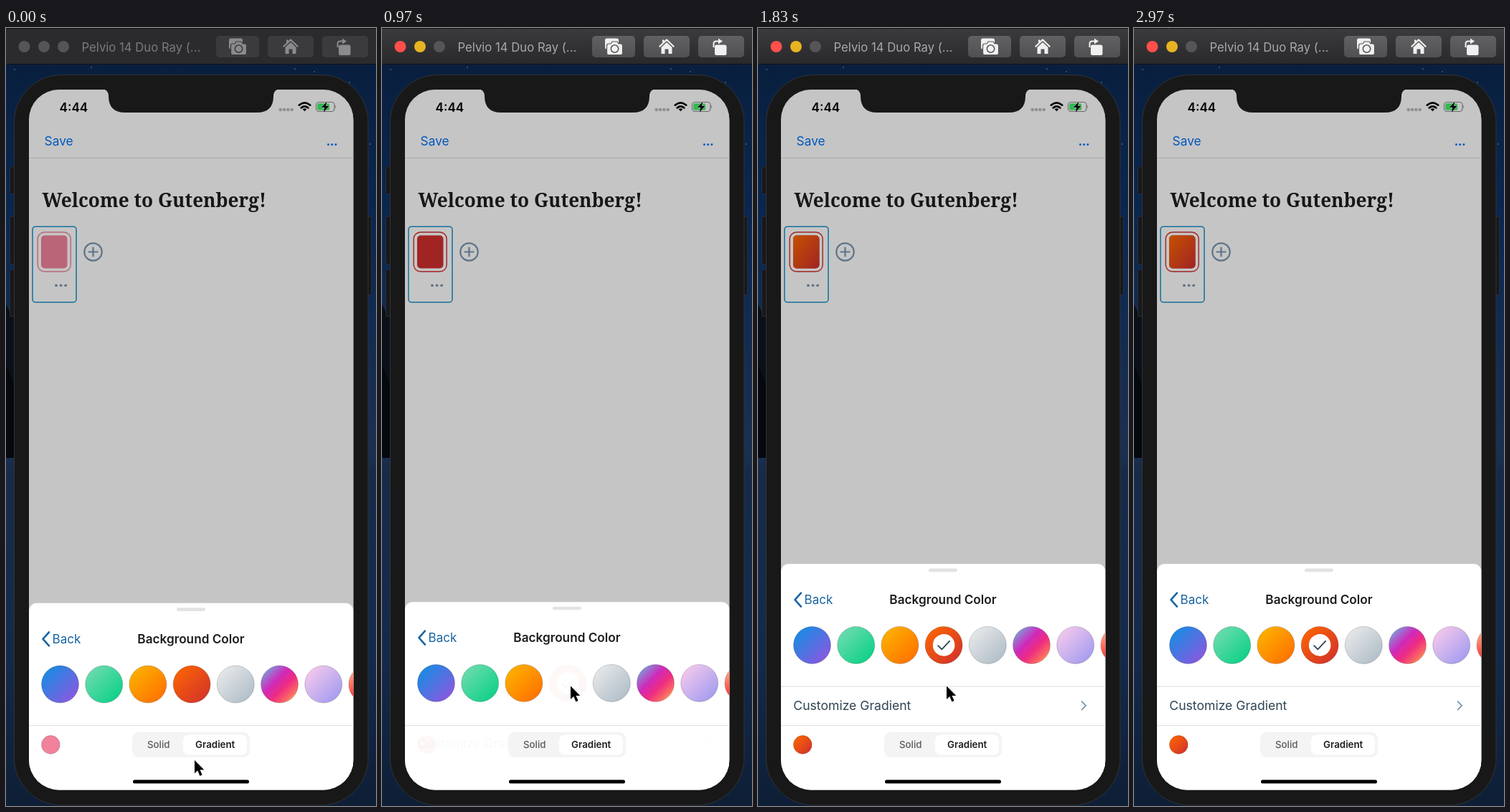
Write an HTML page that moves like this. It is 516 px wide and 1086 px high and loops after 3010 ms.

```html
<!DOCTYPE html>
<html lang="en">
<head>
<meta charset="utf-8">
<title>Gradient picker</title>
<style>
html, body { margin: 0; width: 100%; height: 100%; overflow: hidden; background: #0b1d38; }
svg { display: block; width: 100vw; height: 100vh; }
text { font-family: Inter, "Noto Sans", sans-serif; }
.line { fill: none; stroke-linecap: round; stroke-linejoin: round; }
</style>
</head>
<body>
<svg viewBox="0 0 516 1086" xmlns="http://www.w3.org/2000/svg">
  <defs id="defs">
    <linearGradient id="sky" x2="0" y2="1">
      <stop offset="0" stop-color="#081d3a"/>
      <stop offset=".25" stop-color="#0b2750"/>
      <stop offset=".54" stop-color="#1b2f50"/>
      <stop offset=".57" stop-color="#172b49"/>
      <stop offset=".8" stop-color="#142a4b"/>
      <stop offset="1" stop-color="#0e1e36"/>
    </linearGradient>
    <linearGradient id="bar" x2="0" y2="1">
      <stop offset="0" stop-color="#3b3b3d"/>
      <stop offset="1" stop-color="#29292b"/>
    </linearGradient>
    <linearGradient id="key" x2="0" y2="1">
      <stop offset="0" stop-color="#616163"/>
      <stop offset="1" stop-color="#505052"/>
    </linearGradient>
    <clipPath id="screen"><rect x="32" y="86" width="452.500" height="977.500" rx="42"/></clipPath>
  </defs>

  <!-- desktop -->
  <rect width="516" height="1086" fill="url(#sky)"/>
  <path d="M0 385L5 396L12 402V600H0Z" fill="#0b1018"/>
  <path d="M0 470L12 500V600H0Z" fill="#05080e"/>
  <g id="stars" fill="#9fb4d0"></g>

  <!-- title bar -->
  <rect id="barBg" width="516" height="50"/>
  <path d="M0 .5H516M0 50.500H516" stroke="#111" stroke-width="1"/>
  <circle id="close" cx="25.500" cy="26" r="8"/>
  <circle id="mini" cx="53" cy="26" r="8"/>
  <circle cx="80" cy="26" r="8" fill="#555557"/>
  <text id="device" x="105.500" y="32.500" font-size="16.700">Pelvio 14 Duo Ray (...</text>
  <g id="keys">
    <rect x="293" y="11" width="60" height="30" rx="5"/>
    <rect x="365" y="11" width="64" height="30" rx="5"/>
    <rect x="441" y="11" width="64" height="30" rx="5"/>
  </g>
  <g id="icons">
    <rect x="311" y="14.500" width="19" height="15" rx="2.500"/>
    <path class="ink" d="M316 22H319L321 19H328L330 22H333Q335.500 22 335.500 24.500V35Q335.500 37.500 333 37.500H316Q313.500 37.500 313.500 35V24.500Q313.500 22 316 22Z" stroke-width="1.200"/>
    <circle class="cut" cx="324.500" cy="29" r="5.200" fill="none" stroke-width="1.600"/>
    <path d="M397 15L408 25.500L406.500 27L397 18L387.500 27L386 25.500L391 20.700V16.500H393.500V18.300Z"/>
    <path d="M389.500 27L397 20L404.500 27V36H399.500V29.500H394.500V36H389.500Z"/>
    <rect x="464" y="23.500" width="16.500" height="14.500" rx="2.500"/>
    <path class="wire" d="M462.500 27V22Q462.500 18.500 466 18.500H470" fill="none" stroke-width="2"/>
    <path d="M469 14.500L475 18.500L469 22.500Z"/>
  </g>

  <!-- phone body -->
  <g fill="#17181b" stroke="#2b2d31">
    <rect x="5.500" y="193.500" width="9" height="38" rx="2"/>
    <rect x="5.500" y="263.500" width="9" height="66" rx="2"/>
    <rect x="5.500" y="337.500" width="9" height="65" rx="2"/>
    <rect x="500.500" y="263.500" width="9" height="109" rx="2"/>
  </g>
  <rect x="11.500" y="65.500" width="493.500" height="1019.500" rx="66" fill="#181818" stroke="#303236"/>

  <!-- app -->
  <g clip-path="url(#screen)">
    <rect x="32" y="86" width="453" height="978" fill="#fff"/>
    <text x="74.500" y="116.500" font-size="17.200" font-weight="600">4:44</text>
    <g id="signal" fill="#bababa"></g>
    <g class="line" stroke="#000" stroke-width="2.600" stroke-linecap="butt">
      <path d="M408.700 107.700Q416.500 101 424.300 107.700M411.600 111.400Q416.500 107.200 421.400 111.400"/>
      <path d="M413.600 113.300Q416.500 111 419.400 113.300L416.500 116.300Z" fill="#000" stroke="none"/>
    </g>
    <rect x="432.500" y="103.500" width="25.500" height="13" rx="4" fill="none" stroke="#8d8d8d" stroke-width="1.200"/>
    <rect x="434.200" y="105.200" width="17" height="9.600" rx="2.400" fill="#3ef06a"/>
    <path d="M459.300 107.800Q461.300 110 459.300 112.200Z" fill="#8d8d8d"/>
    <path d="M447.500 102.500L440 111H444.300L442.600 118L450.500 108.800H445.800Z" fill="#000" stroke="#fff" stroke-width="1" paint-order="stroke"/>
    <g fill="#0070f5">
      <text x="53.500" y="163.500" font-size="17.400">Save</text>
      <circle cx="449.500" cy="162.700" r="1.450"/><circle cx="454.700" cy="162.700" r="1.450"/><circle cx="459.900" cy="162.700" r="1.450"/>
    </g>
    <path d="M32 181.500H485" stroke="#dadada"/>
    <text x="50.500" y="249.500" font-size="26.200" font-weight="700" fill="#1e1e1e" style="font-family:'Noto Serif',serif">Welcome to Gutenberg!</text>
    <rect x="37" y="277.200" width="61" height="105.600" rx="4" fill="none" stroke="#1a91cc" stroke-width="1.500"/>
    <rect id="ring" x="44.200" y="285" width="46" height="55" rx="9.500" fill="none" stroke-width="1.400"/>
    <rect id="pill" x="49" y="289.500" width="36.500" height="46" rx="5"/>
    <rect id="pillFade" x="49" y="289.500" width="36.500" height="46" rx="5" fill="url(#g3)"/>
    <g fill="#7b95ae">
      <circle cx="70" cy="359.300" r="1.900"/><circle cx="76.600" cy="359.300" r="1.900"/><circle cx="83.200" cy="359.300" r="1.900"/>
    </g>
    <path class="line" d="M109.300 312.500A12.200 12.200 0 1 0 133.700 312.500A12.200 12.200 0 1 0 109.300 312.500M115.500 312.500H127.500M121.500 306.500V318.500" stroke="#7b95ae" stroke-width="2.200"/>
    <rect x="32" y="86" width="453" height="978" fill="#000" opacity=".227"/>
    <path d="M134 85Q143 86 143 95Q143 118 166 118H350Q373 118 373 95Q373 86 382 85Z" fill="#181818"/>

    <!-- bottom sheet -->
    <g id="sheet">
      <rect x="32" width="452.500" height="400" rx="11" fill="#fff"/>
      <rect x="238" y="6.500" width="40" height="4.600" rx="2.300" fill="#e2e3e5"/>
      <path class="line" d="M60 40.500L51.500 50L60 59.500" stroke="#1a65a3" stroke-width="2.600"/>
      <text x="64.500" y="56.300" font-size="17.100" fill="#1a65a3">Back</text>
      <text x="258" y="56.300" font-size="17.200" font-weight="600" fill="#1d1d1f" text-anchor="middle">Background Color</text>
      <g id="swatches"></g>
    </g>
    <path d="M32 973.700H485" stroke="#dcdcde"/>
    <g id="row">
      <path d="M32 171H485" stroke="#dcdcde"/>
      <text x="49.300" y="204" font-size="17.600" fill="#2e4453">Customize Gradient</text>
      <path class="line" d="M451.500 192L457.200 197.800L451.500 203.600" stroke="#7195b0" stroke-width="1.700"/>
    </g>
    <circle id="dot" cx="62.300" cy="1000.500" r="12.900" stroke="#000" stroke-opacity=".16"/>
    <rect x="176" y="983" width="164" height="35" rx="9" fill="#f4f4f5"/>
    <rect x="247" y="986.500" width="89" height="28" rx="8" fill="#fff"/>
    <g font-size="13.300" text-anchor="middle">
      <text x="212.700" y="1005.300" font-weight="500" fill="#5b5b5e">Solid</text>
      <text x="291.700" y="1005.300" font-weight="600" fill="#1d1d1f">Gradient</text>
    </g>
    <rect x="177" y="1049.400" width="162" height="5.200" rx="2.600"/>
  </g>

  <path id="cursor" d="M0 0V18.500L4.300 14.600L7.400 22L10.600 20.600L7.500 13.400H13.300Z" stroke="#fff" stroke-width="2.400" stroke-linejoin="round" paint-order="stroke"/>
</svg>
<script>
const LOOP = 3010, ACTIVE = 850, PICK = 934, FADE = 300;
const SHUT = 802.800, LIFT = 54.700;
const PINK = '#f0829b', RED = '#cf2e2e';
const $ = id => document.getElementById(id);
const set = (el, attrs) => { for (const k in attrs) el.setAttribute(k, attrs[k]); };
const add = (parent, tag, attrs) => {
  const el = document.createElementNS('http://www.w3.org/2000/svg', tag);
  set(el, attrs);
  return parent.appendChild(el);
};

const gradients = [
  ['#0693e3', '#9b51e0'],
  ['#7adcb4', '#00d082'],
  ['#fcb900', '#ff6900'],
  ['#ff6900', '#cf2e2e'],
  ['#eeeeee', '#a9b8c3'],
  ['#4aeadc', '#9778d1', '#cf2aba', '#ee2c82', '#fb6962', '#fef84c'],
  ['#ffceec', '#9896f0'],
  ['#fecda5', '#fe2d2d', '#6b003e']
];
const swatches = gradients.map((stops, i) => {
  const grad = add($('defs'), 'linearGradient', { id: 'g' + i, x2: 1, y2: 1 });
  stops.forEach((c, j) => add(grad, 'stop', { offset: j / (stops.length - 1), 'stop-color': c }));
  const g = add($('swatches'), 'g', { transform: `translate(${75.500 + 61.200 * i} 113.300)` });
  add(g, 'circle', { r: 26, fill: `url(#g${i})`, stroke: '#000', 'stroke-opacity': .18 });
  return g;
});
const picked = swatches[3];
const check = add(picked, 'g', {});
add(check, 'circle', { r: 15.300, fill: '#fff' });
add(check, 'path', { class: 'line', d: 'M-8 .8L-2.800 6L8 -5.600', stroke: '#2e4453', 'stroke-width': 1.800 });

for (let i = 0; i < 4; i++) add($('signal'), 'circle', { cx: 382.700 + 5.300 * i, cy: 114, r: 2.300 });
for (const [x, y] of [[119, 55], [12, 58], [403, 57], [479, 76], [508, 162], [430, 61]])
  add($('stars'), 'circle', { cx: x, cy: y, r: .8, opacity: .7 });

const clamp = v => Math.min(1, Math.max(0, v));
const smooth = v => v * v * (3 - 2 * v);
// cubic-bezier(.42, 0, .58, 1)
function easeInOut(x) {
  let lo = 0, hi = 1;
  for (let i = 0; i < 20; i++) {
    const s = (lo + hi) / 2, r = 1 - s;
    if (1.26 * s * r * r + 1.74 * s * s * r + s * s * s < x) lo = s; else hi = s;
  }
  return smooth(lo);
}

// time, x, y
const path = [[130, 263, 1022], [630, 263, 918.500], [2130, 263, 918.500], [2430, 181, 127.500], [2900, 41.500, -23]];
function cursorAt(t) {
  let pos = path[0].slice(1);
  for (let i = 1; i < path.length; i++) {
    const [t0, x0, y0] = path[i - 1], [t1, x1, y1] = path[i];
    if (t < t0) break;
    const k = smooth(clamp((t - t0) / (t1 - t0)));
    pos = [x0 + (x1 - x0) * k, y0 + (y1 - y0) * k];
  }
  return pos;
}

function drawWindow(on) {
  const key = on ? '#58585a' : '#3b3b3e', icon = on ? '#f0f0f1' : '#8b8b8e';
  set($('barBg'), { fill: on ? 'url(#bar)' : '#2b2b2e' });
  set($('close'), { fill: on ? '#ff4f4b' : '#555557' });
  set($('mini'), { fill: on ? '#e6b422' : '#555557' });
  set($('device'), { fill: on ? '#a9a9ab' : '#7b7b7e' });
  set($('keys'), { fill: on ? 'url(#key)' : key });
  set($('icons'), { fill: icon });
  document.querySelectorAll('.ink, .cut').forEach(el => set(el, { stroke: key }));
  set(document.querySelector('.wire'), { stroke: icon });
}

function render(t) {
  const on = t >= PICK;
  const p = easeInOut(clamp((t - PICK) / FADE));
  const shown = on ? p : 1;
  const top = `translate(0 ${SHUT - LIFT * p})`;
  drawWindow(t >= ACTIVE);
  set($('sheet'), { transform: top });
  set($('row'), { transform: top, opacity: p });
  set(picked, { opacity: shown });
  set(check, { opacity: on ? 1 : 0 });
  set($('ring'), { stroke: on ? RED : PINK });
  set($('pill'), { fill: on ? RED : PINK });
  set($('pillFade'), { opacity: p });
  set($('dot'), { fill: on ? 'url(#g3)' : PINK, opacity: shown });
  set($('cursor'), { transform: `translate(${cursorAt(t)})` });
}

const start = performance.now();
function tick() {
  render((performance.now() - start) % LOOP);
  requestAnimationFrame(tick);
}
tick();
</script>
</body>
</html>
```
